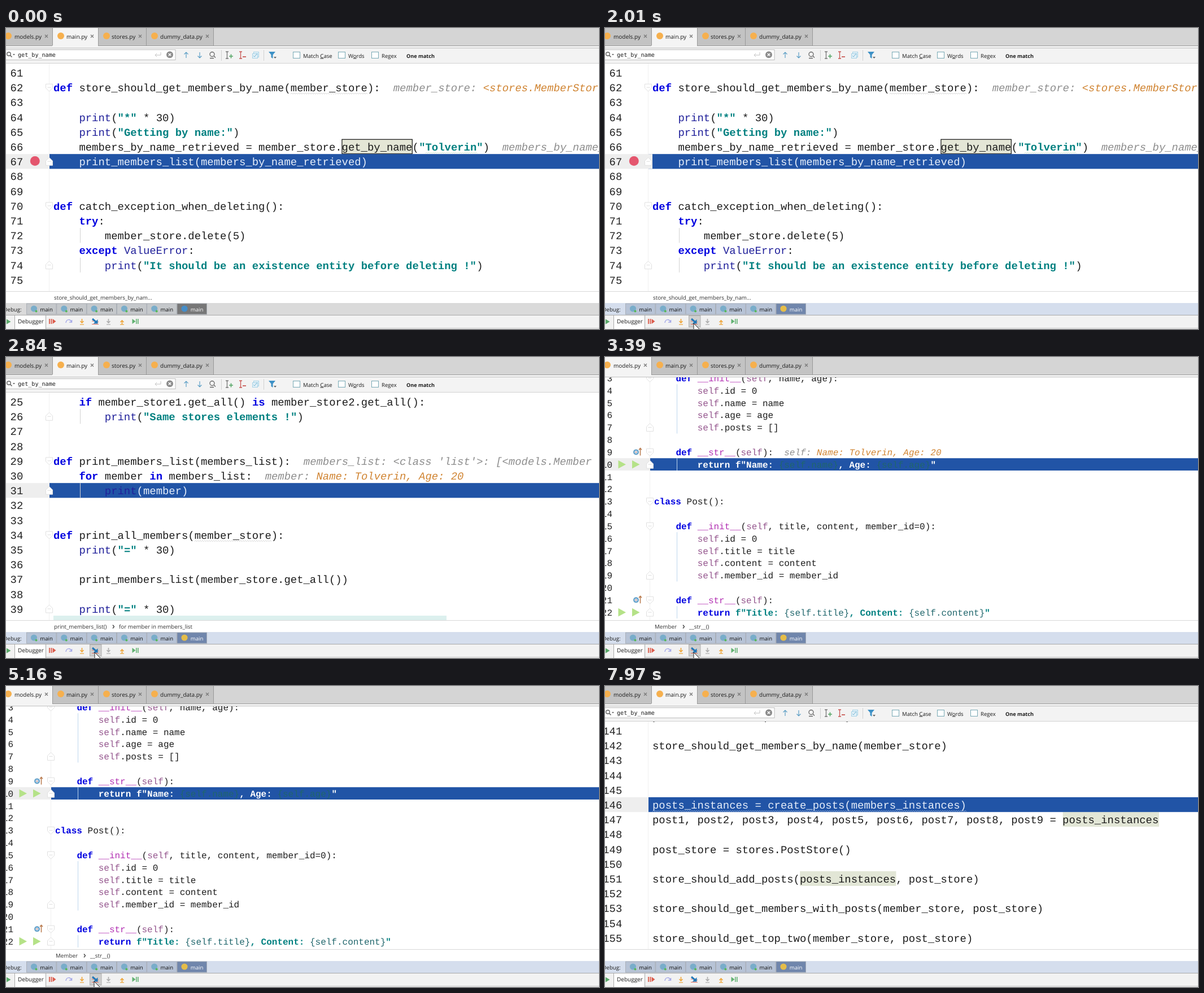
An HTML page that plays this animation: 1050 px wide and 533 px high, repeating every 8.68 s.

```html
<!DOCTYPE html>
<html lang="en">
<head>
<meta charset="utf-8">
<title>Debugger session</title>
<style>
html, body { margin: 0; height: 100%; overflow: hidden; background: #fff; }
svg { display: block; width: 100vw; height: 100vh; }
text { white-space: pre; text-rendering: geometricPrecision; font-family: "Open Sans", "Noto Sans", sans-serif; font-size: 9.9px; fill: #1c1c1c; }
.code text { font-family: "Liberation Mono", monospace; font-size: inherit; }
.code .kw { fill: #0000e0; font-weight: bold; }
.code .fn { fill: #20209a; }
.code .str { fill: #008080; font-weight: bold; }
.code .expr { fill: #20666c; }
.code .self { fill: #94558d; }
.code .magic { fill: #b22fb2; }
.code .hint { fill: #8d8d8d; font-style: italic; }
.code .val { fill: #d08432; font-style: italic; }
.code .num { fill: #222; }
.band { display: none; }
.hit .band { display: inline; }
.hit text { fill: #e6eefa; }
.hit .kw, .hit .str { fill: #fff; }
.hit .hint, .hit .val { fill: #00e060; }
.hit .num { fill: #222; }
.line { fill: none; }
</style>
</head>
<body>
<svg viewBox="0 0 1050 533" preserveAspectRatio="none"></svg>
<script>
const NAME = 'Tolverin';
const MEMBER = `Name: ${NAME}, Age: 20`;
const LOOP = 8680;

const esc = s => s.replace(/&/g, '&amp;').replace(/</g, '&lt;');
const rect = (x, y, w, h, fill, extra = '') => `<rect x="${x}" y="${y}" width="${w}" height="${h}" fill="${fill}" ${extra}/>`;
const dot = (x, y, r, fill) => `<circle cx="${x}" cy="${y}" r="${r}" fill="${fill}"/>`;
const shape = (d, fill) => `<path d="${d}" fill="${fill}"/>`;
const line = (d, color, width = 1) => `<path class="line" d="${d}" stroke="${color}" stroke-width="${width}"/>`;
const label = (x, y, s, extra = '') => `<text x="${x}" y="${y}" ${extra}>${s}</text>`;
const when = (flag, body) => `<g data-if="${flag}">${body}</g>`;
const wave = (x, y, w, color) => line(`M${x} ${y}` + 'l2 -2l2 2'.repeat(Math.round(w / 4)), color, 0.8);

// Splits a source line into [class, text] pieces.
function tokens(src) {
  const rule = /(f?"[^"]*")|\b(def|for|in|is|if|try|except|return|class)\b|\b(print|ValueError)\b|\b(self)\b|(__\w+__)/g;
  const kinds = ['str', 'kw', 'fn', 'self', 'magic'];
  const out = [];
  let at = 0;
  for (const m of src.matchAll(rule)) {
    out.push(['', src.slice(at, m.index)]);
    const kind = kinds[m.slice(1).findIndex(Boolean)];
    if (kind === 'str' && m[0][0] === 'f') {
      for (const part of m[0].split(/(\{[^}]*\})/)) out.push([part[0] === '{' ? 'expr' : 'str', part]);
    } else out.push([kind, m[0]]);
    at = m.index + m[0].length;
  }
  out.push(['', src.slice(at)]);
  return out;
}

function fold(x, y, up) {
  const d = up ? `M${x - 6} ${y + 7}v-8l6 -6l6 6v8z` : `M${x - 6} ${y - 6}h12v7l-6 6l-6 -6z`;
  return `<path d="${d}" fill="#fff" stroke="#e0e0e0"/>` + line(`M${x - 3} ${y}h6`, '#ddd');
}

function pane(id, o) {
  const step = o.size * 0.6001;
  const top = n => o.top + (n - o.first) * o.pitch;
  const colX = c => o.x + c * step;
  const rows = o.code.split('\n').map((src, i) => {
    const n = o.first + i;
    const base = top(n) + o.base;
    let col = 0;
    const put = ([kind, s]) => {
      const lead = s.length - s.trimStart().length;
      const body = s.trim() ? label(colX(col + lead).toFixed(2), base, esc(s.trim()), `class="${kind}"`) : '';
      col += s.length;
      return body;
    };
    const band = rect(0, top(n), o.left, o.pitch, '#eee', 'class="band"') +
      rect(o.left, top(n), 1050 - o.left, o.pitch, '#2154a6', 'class="band"');
    let body = band + tokens(src).map(put).join('');
    const hint = (o.hints || {})[n];
    if (hint) {
      col = src.length + 2;
      body += when('h' + n, put(['hint', hint[0]]) + put(['val', hint[1] || '']));
    }
    return `<g data-line="${n}">${body}${label(o.numX, base, n, 'class="num" text-anchor="end"')}</g>`;
  });
  const guides = o.guides.map(([a, b]) => line(`M${o.guideX} ${top(a)}V${top(b + 1)}`, o.guideColor)).join('');
  const folds = up => (up ? o.ends : o.starts).map(n => fold(o.left - 0.5, top(n) + o.pitch / 2, up)).join('');
  const extra = f => f ? f(colX, top, step) : '';
  return when(id, `<g class="code" clip-path="url(#page)" font-size="${o.size}">` +
    line(`M${o.left - 0.5} 36V466`, '#f0f0f0') + extra(o.under) + rows.join('') + guides +
    extra(o.over) + folds(false) + folds(true) + '</g>');
}

const mainStyle = {
  x: 84, size: 18.92, pitch: 26.21, base: 20, numX: 30.3, left: 77,
  guideX: 131.5, guideColor: '#d2d2d2', guides: [], starts: [], ends: []
};
// Main file panes begin one row above the visible area.
const mainPane = (id, o) => pane(id, { ...mainStyle, top: 39.7, ...o });

const testPane = mainPane('test', {
  first: 60, starts: [62, 70], ends: [67, 74], guides: [[72, 72], [74, 74]],
  code: `

def store_should_get_members_by_name(member_store):

    print("*" * 30)
    print("Getting by name:")
    members_by_name_retrieved = member_store.get_by_name("${NAME}")
    print_members_list(members_by_name_retrieved)


def catch_exception_when_deleting():
    try:
        member_store.delete(5)
    except ValueError:
        print("It should be an existence entity before deleting !")
`,
  hints: { 62: ['member_store: ', '<stores.MemberStore'], 66: ['members_by_name_retrieved'] },
  under: (x, y, w) => rect(x(45), y(66) + 0.3, w * 11 - 0.5, 25.5, '#e4e6d6', 'stroke="#111" stroke-width="1.2"'),
  over: (x, y, w) => wave(x(37), y(62) + 25, w * 12, '#ccc') + wave(x(58), y(66) + 25, w * 8, '#c4dcc0') +
    when('inset', rect(77, y(67), 7, 26.2, '#eee')) + dot(51.3, 235.6, 8.5, '#e4566e')
});

const listPane = mainPane('list', {
  first: 24, starts: [29, 34], ends: [26, 31, 39], guides: [[26, 26], [31, 31]],
  code: `    member_store
    if member_store1.get_all() is member_store2.get_all():
        print("Same stores elements !")


def print_members_list(members_list):
    for member in members_list:
        print(member)


def print_all_members(member_store):
    print("=" * 30)

    print_members_list(member_store.get_all())

    print("=" * 30)`,
  hints: { 29: ["members_list: <class 'list'>: [<models.Member"], 30: ['member: ', MEMBER] },
  over: (x, y, w) => wave(x(22), y(34) + 25, w * 12, '#ccc') + when('strip', rect(84, 458, 696, 9, '#dcf0ee'))
});

const postsPane = mainPane('posts', {
  first: 140,
  code: `print_all_members(member_store)

store_should_get_members_by_name(member_store)



posts_instances = create_posts(members_instances)
post1, post2, post3, post4, post5, post6, post7, post8, post9 = posts_instances

post_store = stores.PostStore()

store_should_add_posts(posts_instances, post_store)

store_should_get_members_with_posts(member_store, post_store)

store_should_get_top_two(member_store, post_store)`,
  under: (x, y, w) => when('usages', [[64, 147], [23, 151]].map(([c, n]) => rect(x(c), y(n), w * 15, 26, '#e2e6d6')).join('')),
  over: (x, y, w) => wave(x(0), y(146) + 25.5, w * 49, '#a9c0e4')
});

const modelsPane = pane('models', {
  x: 87, size: 15.99, pitch: 21.83, base: 16.6, top: 26.4, first: 3, numX: 13, left: 80,
  guideX: 127.5, guideColor: '#bdd6ee', guides: [[4, 7], [10, 10], [16, 19], [22, 22]],
  starts: [3, 9, 13, 15, 21], ends: [7, 10, 19, 22],
  code: `    def __init__(self, name, age):
        self.id = 0
        self.name = name
        self.age = age
        self.posts = []

    def __str__(self):
        return f"Name: {self.name}, Age: {self.age}"


class Post():

    def __init__(self, title, content, member_id=0):
        self.id = 0
        self.title = title
        self.content = content
        self.member_id = member_id

    def __str__(self):
        return f"Title: {self.title}, Content: {self.content}"`,
  hints: { 9: ['self: ', MEMBER] },
  over: (x, y) => wave(x(10), y(13) + 20, 24, '#ddd') + [9, 21].map(n => {
    const c = y(n) + 11;
    return dot(55, c, 5, '#6ba6cc') + dot(55, c, 2.4, '#eef') + line(`M55 ${c - 1}v2M62.5 ${c + 6}v-13m-2.5 3l2.5 -3l2.5 3`, '#b8794c', 1.5) +
      [23.5, 48].map(a => shape(`M${a} ${c + 14.5}l13.5 7.3l-13.5 7.3z`, '#b5e288')).join('');
  }).join('')
});

function fileTabs() {
  const tabs = [['models.py', 0, 82, 4, 15], ['main.py', 82, 163, 97, 107], ['stores.py', 163, 248, 178, 187], ['dummy_data.py', 248, 367, 263, 273]];
  const active = (x, w) => rect(x, 0, w, 33, '#f4f4f4');
  return rect(0, 0, 1050, 36, '#f4f4f4') + rect(0, 0, 1050, 31, '#d5d5d5') + rect(0, 0, 367, 31, '#c3c3c3') +
    line('M0 31.5H1050', '#9c9c9c') + line('M0 35.5H1050', '#c0c0c0') +
    when('main', active(82, 81)) + when('models', active(0, 82)) +
    tabs.map(([name, , right, icon, x]) => dot(icon, 14, 6, '#f6b04e') + label(x, 18.5, name, 'style="font-size:10px"') +
      line(`M${right - 13} 12l5 5m0 -5l-5 5`, '#777', 1.2) + line(`M${right + 0.5} 0V31`, '#999')).join('');
}

function findBar() {
  const check = (x, y, s) => rect(x + 0.5, 42.5, 12, 11, '#fff', 'stroke="#78a9b5"') + label(x + 18, 52.5, s, 'style="font-size:9.6px"');
  const u = c => `<tspan text-decoration="underline">${c}</tspan>`;
  const caret = (x, color) => line(`M${x} 42h5m-2.5 0v12m-2.5 0h5`, color, 1.3);
  return when('main', rect(0, 36, 1050, 26, '#f3f3f3') + line('M0 62.5H1050', '#d2d2d2') +
    rect(-2, 38.5, 302, 18, '#fff', 'stroke="#bdbdbd"') +
    '<circle class="line" cx="5" cy="46" r="3.2" stroke="#666" stroke-width="1.4"/>' + line('M7.5 48.5l3 3', '#666', 1.6) + shape('M12 46h4l-2 2.5z', '#666') +
    label(21, 51, 'get_by_name', 'style="font:10.1px \'DejaVu Sans Mono\',monospace"') +
    line('M274 43v5h-10m3 -3l-3 3l3 3', '#c2c2c2') + dot(290, 47.3, 6, '#8b8b8b') + line('M287.7 45l4.6 4.6m0 -4.6l-4.6 4.6', '#fff', 1.4) +
    line('M319 53v-10m-3.5 3.5l3.5 -3.5l3.5 3.5M343 43v10m-3.5 -3.5l3.5 3.5l3.5 -3.5', '#5d9fc6', 1.2) +
    '<circle class="line" cx="365" cy="46.5" r="4" stroke="#666" stroke-width="1.3"/>' + line('M368 49.5l3 3M361 53.5h7', '#666', 1.3) +
    line('M381.5 39V58M456.5 39V58', '#d0d0d0') +
    caret(389, '#777') + line('M395 50h7m-3.5 -3.5v7', '#59a869', 1.7) + caret(413, '#c75450') + line('M419 51h6', '#c75450', 1.7) +
    rect(438.5, 42.5, 9, 9, '#e4f1f8', 'stroke="#a6d2e6"') + rect(436.5, 45.5, 9, 8, '#e4f1f8', 'stroke="#a6d2e6"') + line('M438 49l2 2l5 -6', '#6eb2d2') +
    shape('M465 42h12l-4.5 5.5v6.5l-3 -2v-4.5z', '#3d91c6') + shape('M474 51h5l-2.5 3z', '#666') +
    check(508, 48, `Match ${u('C')}ase`) + check(588, 48, `W${u('o')}rds`) + check(647, 48, `Re${u('g')}ex`) +
    label(709, 53, 'One match', 'style="font-size:9.1px;font-weight:bold"'));
}

function debugPanel() {
  const header = (bg, tab, active, icon) => rect(0, 487, 1050, 21, bg) +
    [0, 1, 2, 3, 4, 5].map(i => {
      const x = 36.5 + i * 53.3;
      const on = i === 5;
      return rect(x, 488, 52.5, 19, on ? active : tab, 'stroke="#a3a8b0" stroke-width=".8"') +
        dot(x + 13, 497, 5.6, on ? icon : '#79adca') + (on ? '' : dot(x + 17, 501.5, 2, '#58b858')) +
        label((x + 23.8).toFixed(1), 501.5, 'main', `style="font-size:9.6px;fill:${on ? '#fff' : '#111'}"`);
    }).join('');
  const arrow = (x, color, dir) => line(`M${x} ${520 - 5 * dir}v${dir * 7}m-3 ${-3 * dir}l3 ${3 * dir}l3 ${-3 * dir}`, color, 1.6) + line(`M${x - 3.5} 525h7`, color, 1.2);
  return rect(0, 467, 1050, 20, '#fff') + line('M0 466.5H1050', '#d8d8d8') +
    when('idle', header('#dadada', '#c5c8cb', '#777', '#458dc8')) + when('focus', header('#d5deed', '#b7c3d6', '#7086ac', '#e5bd49')) +
    label(-4.5, 501.5, 'Debug:', 'style="font-size:9.6px"') +
    rect(0, 508, 1050, 25, '#f2f2f2') + line('M0 508.5H1050', '#aaa') + line('M71 531.5H1050', '#c4c4c4') +
    rect(15.5, 508.5, 55, 26, '#fff', 'stroke="#aaa"') + label(21, 523, 'Debugger', 'style="font-size:10px"') +
    shape('M1 515.5l7.5 4.5l-7.5 4.5z', '#59a869') +
    line('M77 515v9M80.3 515v9', '#db5c4c', 1.8) + shape('M82.5 515l6 4.5l-6 4.5z', '#db5c4c') +
    line('M106 522c1 -7 8 -7 10 -1m-4 0h4.500v-4', '#a5a9e8', 1.5) +
    arrow(134.5, '#eea63a', 1) +
    when('hover', rect(148.5, 509.5, 20.5, 20, '#cfcfcf', 'stroke="#b0b0b0"')) +
    line('M152 519h4M152 524.5h12M159 520.5h5', '#e06c5c', 1.2) + line('M153 515l7 6', '#2379b8', 3) + shape('M162.500 516v7.500h-8z', '#2379b8') +
    arrow(181.5, '#adadad', 1) + arrow(205.5, '#eea63a', -1) +
    shape('M223.500 515l6 4.500l-6 4.500z', '#62b272') + line('M230.800 515v9M233.800 515v9', '#62b272', 1.600);
}

function crumbs() {
  const crumb = (flag, ...parts) => when(flag, parts.map(([x, s], i) =>
    label(x, 481, s, 'style="font-size:9.8px;fill:#333"') + (i ? line(`M${x - 11} 474.5l2.500 3l-2.500 3`, '#333', 1.2) : '')).join(''));
  return crumb('cTest', [85, 'store_should_get_members_by_nam...']) + crumb('cList', [85, 'print_members_list()']) +
    crumb('cLoop', [85, 'print_members_list()'], [200, 'for member in members_list']) + crumb('cStr', [88, 'Member'], [149, '__str__()']);
}

const svg = document.querySelector('svg');
svg.innerHTML = '<clipPath id="page"><rect y="36" width="1050" height="431"/></clipPath>' + rect(0, 0, 1050, 533, '#fff') +
  testPane + listPane + postsPane + modelsPane + fileTabs() + findBar() + debugPanel() + crumbs() +
  '<path id="pointer" d="M0 0v14.500l3.400 -3.200l2.400 5l2.200 -1l-2.300 -4.800h4.800z" fill="#fff" stroke="#111" stroke-width=".9"/>';

// What is visible from each moment on; a number is the line being executed.
const cues = [
  [0, 'main test 67 h62 h66 cTest idle'],
  [1600, 'main test 67 h62 h66 cTest idle hover'],
  [1820, 'main test 67 h62 h66 cTest focus hover'],
  [2010, 'main test 67 h62 h66 cTest focus hover inset'],
  [2070, 'main list 30 cTest focus hover'],
  [2240, 'main list 30 h29 cTest focus hover'],
  [2610, 'main list 31 strip cTest focus hover'],
  [2760, 'main list 31 strip h29 h30 cTest focus hover'],
  [2840, 'main list 31 strip h29 h30 cLoop focus hover'],
  [3240, 'models 10 cStr focus hover'],
  [3390, 'models 10 h9 cStr focus hover'],
  [3930, 'main list 30 cStr focus hover'],
  [4000, 'main list 30 cList focus hover'],
  [4150, 'main list 30 h29 h30 cList focus hover'],
  [4530, 'main list 31 cList focus hover'],
  [4700, 'main list 31 h29 h30 cList focus hover'],
  [4810, 'main list 31 h29 h30 cLoop focus hover'],
  [5160, 'models 10 cStr focus hover'],
  [5320, 'models 10 h9 cStr focus hover'],
  [5770, 'main list 30 cStr focus hover'],
  [5870, 'main list 30 h29 h30 cList focus hover'],
  [6180, 'main posts 146 cList focus hover'],
  [6540, 'main posts 146 usages cList focus hover'],
  [6650, 'main posts 146 usages focus hover'],
  [6980, 'main posts 146 usages focus']
].map(([at, flags]) => [at, new Set(flags.split(' '))]);

const clamp = p => Math.min(1, Math.max(0, p));
function glide(p, [x0, y0], [x1, y1], lift) {
  const e = p * p * (3 - 2 * p);
  return [x0 + (x1 - x0) * e, y0 + (y1 - y0) * e - lift * Math.sin(Math.PI * e)];
}

function pointerAt(t) {
  if (t < 420 || t >= 7970) return [-50, -50];
  if (t < 1350) return glide(clamp(Math.floor((t - 420) / 78) / 11), [939, 525], [183, 528], 80);
  if (t < 1440) return [172, 530];
  if (t < 1600) return [160, 529];
  if (t < 6980) return [t < 4460 ? 157 : 156, 523];
  if (t < 7890) return glide(clamp((Math.floor((t - 6980) / 73.6) + 1) / 12), [156, 523], [950, 521], 88);
  return [957, 527];
}

const pointer = document.getElementById('pointer');
const optional = [...svg.querySelectorAll('[data-if]')];
const codeLines = [...svg.querySelectorAll('[data-line]')];
let shown;

function draw(now) {
  const t = now % LOOP;
  const flags = cues.filter(([at]) => at <= t).pop()[1];
  if (flags !== shown) {
    for (const el of optional) el.style.display = flags.has(el.dataset.if) ? '' : 'none';
    for (const el of codeLines) el.classList.toggle('hit', flags.has(el.dataset.line));
    shown = flags;
  }
  pointer.setAttribute('transform', `translate(${pointerAt(t)})`);
}

const start = performance.now();
function tick() {
  draw(performance.now() - start);
  requestAnimationFrame(tick);
}
tick();
</script>
</body>
</html>
```
